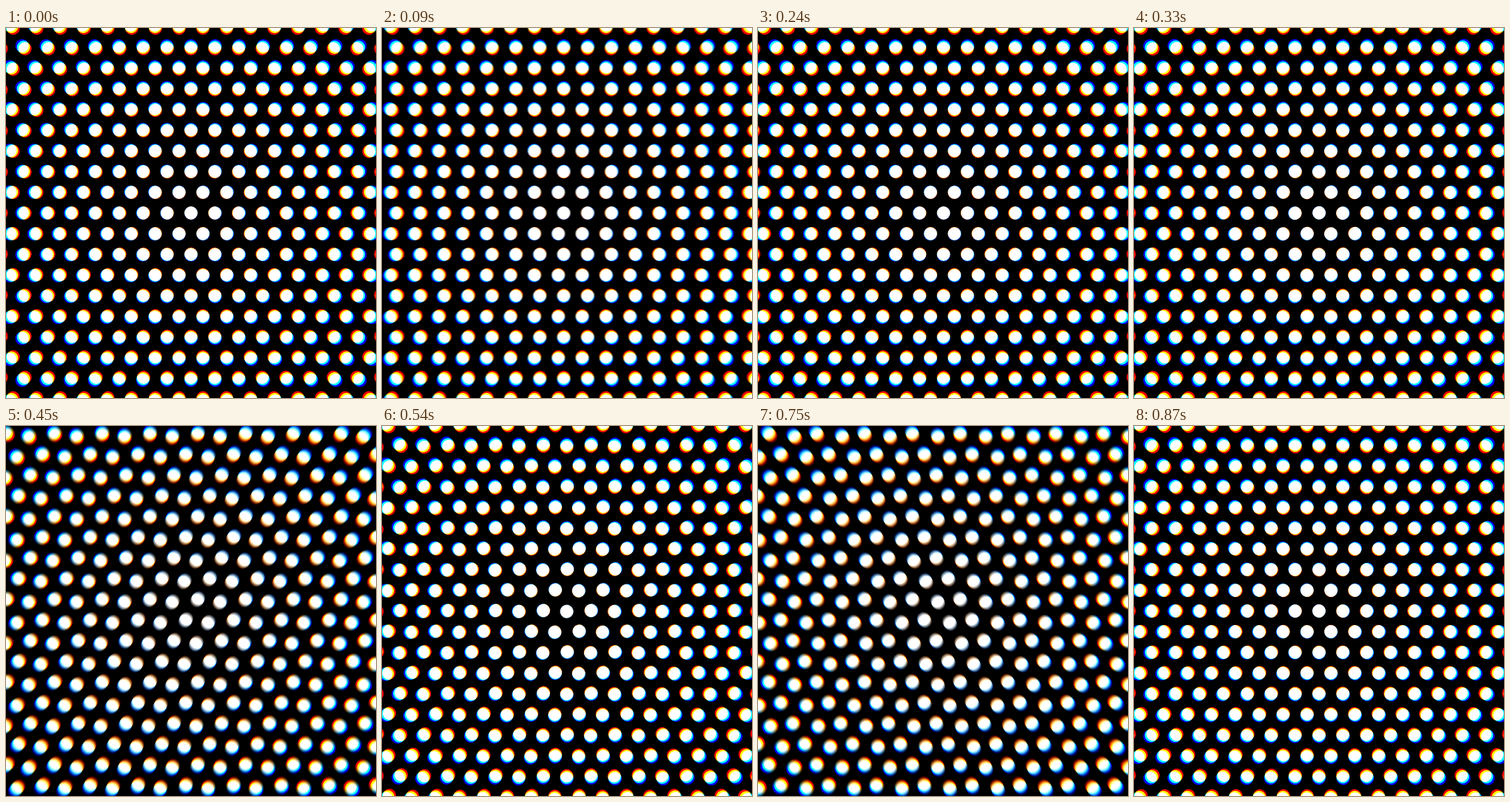
Write an HTML page with a canvas that moves like this. It is 500 by 500 pixels and loops after 0.9 s.

```html
<!DOCTYPE html>
<html lang="en">
<head>
<meta charset="utf-8">
<title>Sliding dots</title>
<style>
  html, body { margin: 0; width: 100%; height: 100%; overflow: hidden; background: #000; }
  canvas { display: block; width: 500px; height: 500px; }
</style>
</head>
<body>
<canvas id="stage" width="500" height="500"></canvas>
<script>
const ctx = document.getElementById('stage').getContext('2d');

const LOOP = 900, STEP = 30, SLIDE_STEPS = 10;
const ROW = 28, GAP = ROW * 2 / Math.sqrt(3), RADIUS = 9, REACH = 14;
const SAMPLES = 5, SHUTTER = 0.6;
const LEVEL = 255 / SAMPLES;

// Each colour channel is magnified a little differently about the centre.
const CHANNELS = [
  { color: `rgb(${LEVEL},0,0)`, scale: 0.991 },
  { color: `rgb(0,${LEVEL},0)`, scale: 1 },
  { color: `rgb(0,0,${LEVEL})`, scale: 1.009 }
];

const ease = t => t < 0.5 ? 4 * t ** 3 : 1 - 4 * (1 - t) ** 3;

// All even or all odd rows of the hexagonal lattice.
function buildRows(parity) {
  const path = new Path2D();
  for (let j = -REACH; j <= REACH; j++) {
    if (Math.abs(j) % 2 !== parity) continue;
    for (let i = -REACH; i <= REACH; i++) {
      const x = (i + parity / 2) * GAP, y = j * ROW;
      path.moveTo(x + RADIUS, y);
      path.arc(x, y, RADIUS, 0, Math.PI * 2);
    }
  }
  return path;
}

const evenRows = buildRows(0), oddRows = buildRows(1);

function drawRows(path, angle, shift, scale) {
  ctx.setTransform(scale, 0, 0, scale, 250, 250);
  ctx.rotate(angle);
  ctx.translate(shift, 0);
  ctx.fill(path);
}

function draw(step) {
  const phase = Math.floor(step / SLIDE_STEPS);
  const angle = Math.PI + phase * Math.PI * 2 / 3;

  ctx.setTransform(1, 0, 0, 1, 0, 0);
  ctx.globalCompositeOperation = 'source-over';
  ctx.fillStyle = '#000';
  ctx.fillRect(0, 0, 500, 500);

  // Motion blur: add up several moments while the shutter is open.
  ctx.globalCompositeOperation = 'lighter';
  for (let s = 0; s < SAMPLES; s++) {
    const t = (step % SLIDE_STEPS + SHUTTER * s / SAMPLES) / SLIDE_STEPS;
    const shift = ease(t) * GAP;
    for (const { color, scale } of CHANNELS) {
      ctx.fillStyle = color;
      drawRows(evenRows, angle, shift, scale);
      drawRows(oddRows, angle, -shift, scale);
    }
  }
}

const start = performance.now();
let shown = -1;

function tick() {
  const step = Math.floor((performance.now() - start) % LOOP / STEP);
  if (step !== shown) draw(shown = step);
  requestAnimationFrame(tick);
}
tick();
</script>
</body>
</html>
```
